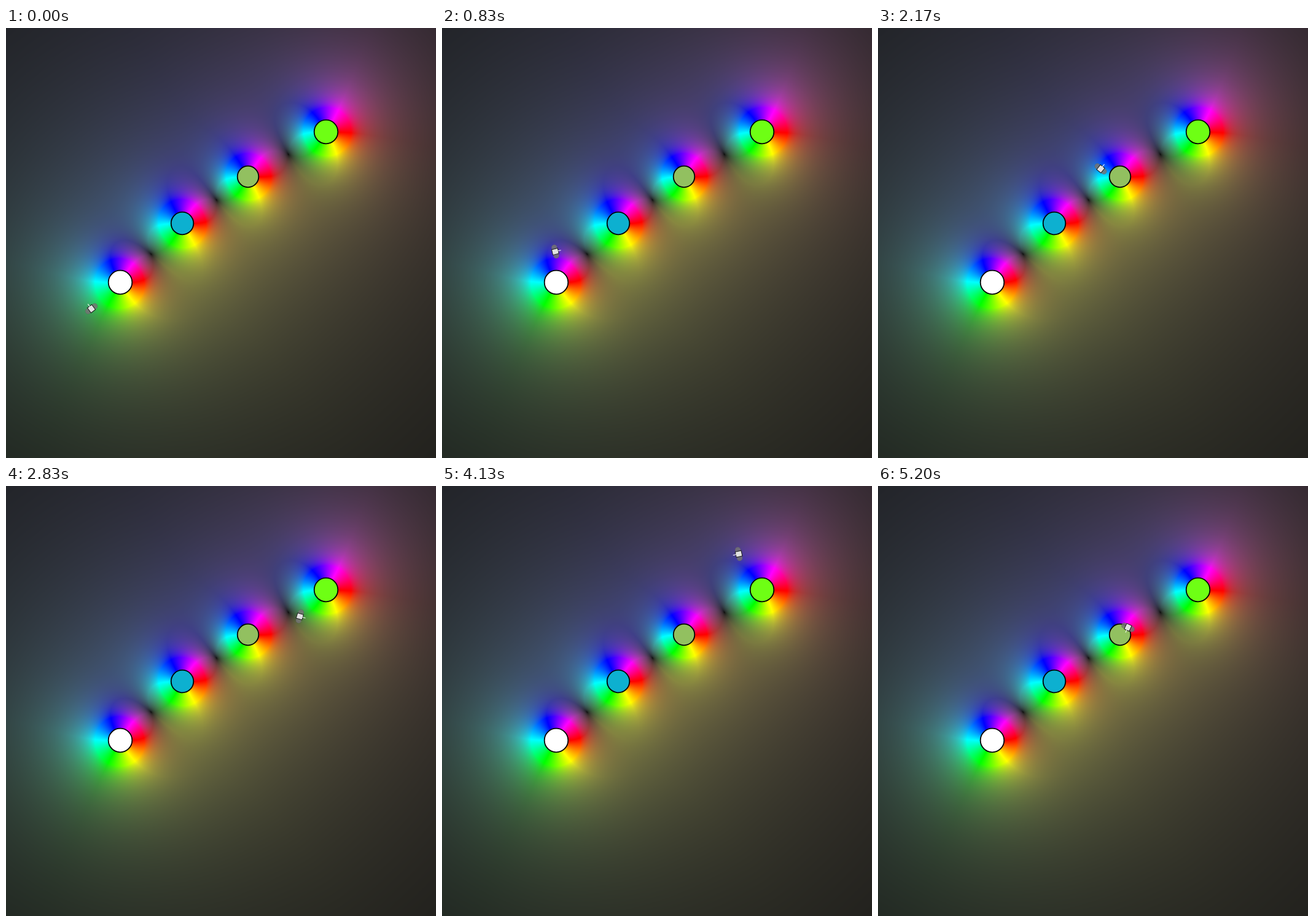
Animation of 700x700 px, one loop 5230 ms. Source, as an HTML page with a canvas:

```html
<!DOCTYPE html>
<html lang="en">
<head>
<meta charset="utf-8">
<title>Probe in a gravity field</title>
<style>
  html, body { margin: 0; width: 100%; height: 100%; overflow: hidden; background: #222; }
  canvas, svg { position: absolute; left: 0; top: 0; width: 700px; height: 700px; }
  .planet { stroke: #000; stroke-width: 1.8; }
  .panel { fill: #747474; fill-opacity: .85; stroke: #555; stroke-opacity: .4; stroke-width: .6; }
  .hull { fill: #e2e2e2; stroke: #1c1c1c; stroke-width: 1; }
  .antenna { stroke: #fff; stroke-width: 1; }
</style>
</head>
<body>
<canvas id="field" width="700" height="700"></canvas>
<svg id="scene" viewBox="0 0 700 700">
  <g id="probe">
    <ellipse class="panel" cy="-7" rx="4.5" ry="4.3"/>
    <ellipse class="panel" cy="7" rx="4.5" ry="4.3"/>
    <rect class="hull" x="-5" y="-4.5" width="10" height="9"/>
    <line class="antenna" x1="4" x2="9.5"/>
  </g>
</svg>
<script>
const SIZE = 700, LOOP = 5230, GAIN = 39.2;
const probe = document.getElementById('probe');

const planets = [
  { x: 186, y: 414, r: 19.3, mass: 1.05, fill: '#ffffff' },
  { x: 287, y: 318, r: 18.3, mass: 1, fill: '#0db0d0' },
  { x: 394, y: 242, r: 17.3, mass: 0.91, fill: '#92c060' },
  { x: 521, y: 169, r: 19.3, mass: 1, fill: '#6eff14' }
];

// Waypoints at equal time steps; the first and last only set the end headings
const route = [
  [176.5, 483.5], [139, 457], [126.8, 417.5], [155.7, 375.5], [210.5, 359.5],
  [265, 362.5], [324, 326], [341, 265], [379.3, 213.5], [439.5, 202.6],
  [497, 215.3], [550.5, 200.5], [553.6, 139.6], [511, 111], [470, 115],
  [448, 140.7], [429.8, 179.4], [404.3, 235.6], [371, 300]
];
const LEG = LOOP / (route.length - 3);

// Hue shows the direction of the pull, brightness and saturation its strength
function paintField() {
  const ctx = document.getElementById('field').getContext('2d');
  const image = ctx.createImageData(SIZE, SIZE);
  let i = 0;
  for (let y = 0; y < SIZE; y++) {
    for (let x = 0; x < SIZE; x++) {
      let gx = 0, gy = 0;
      for (const p of planets) {
        const dx = x - p.x, dy = y - p.y;
        const pull = p.mass / (Math.hypot(dx, dy) ** 3 || 1);
        gx += dx * pull;
        gy += dy * pull;
      }
      const level = Math.min(1, GAIN * Math.sqrt(Math.hypot(gx, gy)));
      const hue = (Math.atan2(gy, gx) / Math.PI * 3 + 6) % 6;
      for (const shift of [0, 4, 2]) {
        const pure = Math.max(0, Math.min(1, Math.abs((hue + shift) % 6 - 3) - 1));
        image.data[i++] = 255 * level * (1 - level + level * pure);
      }
      image.data[i++] = 255;
    }
  }
  ctx.putImageData(image, 0, 0);
}

function addPlanets() {
  for (const { x, y, r, fill } of planets) {
    const disc = document.createElementNS('http://www.w3.org/2000/svg', 'circle');
    const attrs = { class: 'planet', cx: x, cy: y, r, fill };
    for (const name in attrs) disc.setAttribute(name, attrs[name]);
    probe.before(disc);
  }
}

// Catmull-Rom position and rate along one axis
function curve(i, axis, u) {
  const [a, b, c, d] = route.slice(i, i + 4).map(point => point[axis]);
  const k1 = (c - a) / 2;
  const k2 = a - 2.5 * b + 2 * c - d / 2;
  const k3 = (d - a + 3 * (b - c)) / 2;
  return {
    pos: b + u * (k1 + u * (k2 + u * k3)),
    rate: k1 + u * (2 * k2 + 3 * u * k3)
  };
}

function placeProbe(t) {
  const leg = Math.floor(t / LEG), u = t / LEG - leg;
  const x = curve(leg, 0, u), y = curve(leg, 1, u);
  const heading = Math.atan2(y.rate, x.rate) * 180 / Math.PI;
  probe.setAttribute('transform', `translate(${x.pos} ${y.pos}) rotate(${heading})`);
}

// Thirty steps a second, each start rounded to 10 ms
const stepTime = t => Math.floor((Math.floor(t / 10) + 0.5) * 0.3) * 100 / 3;

const start = performance.now();
function tick() {
  placeProbe(stepTime((performance.now() - start) % LOOP));
  requestAnimationFrame(tick);
}

paintField();
addPlanets();
tick();
</script>
</body>
</html>
```
